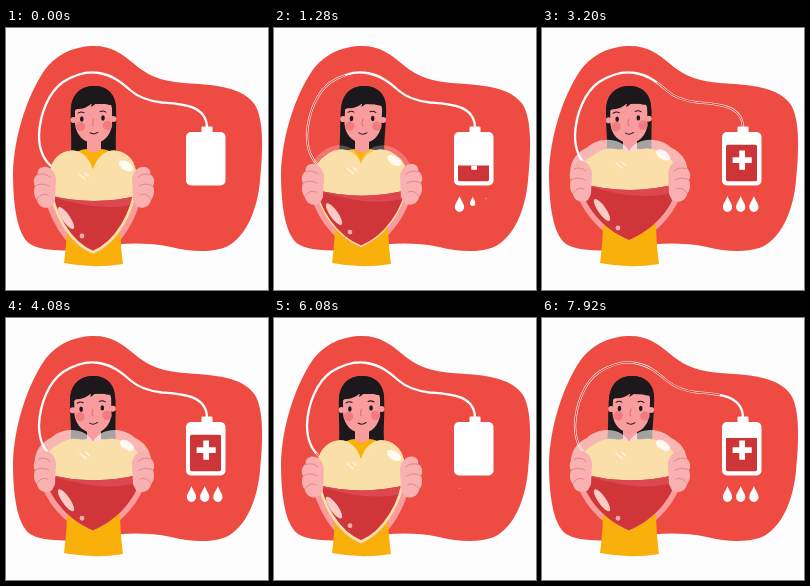
Write an HTML page that moves like this. It is 262 by 262 pixels and loops after 8 s.

```html
<!DOCTYPE html>
<html lang="en">
<head>
<meta charset="utf-8">
<title>Blood donation</title>
<style>
html, body { margin: 0; width: 100%; height: 100%; overflow: hidden; background: #fdfdfd; }
svg { display: block; width: 100vw; height: 100vh; }
.line { fill: none; stroke-linecap: round; stroke-linejoin: round; }
.skin { fill: #f99c9d; }
.hair { fill: #1d181c; }
</style>
</head>
<body>
<svg viewBox="0 0 262 262">
  <defs>
    <path id="heart"/>
    <clipPath id="heartClip"><use href="#heart"/></clipPath>
    <clipPath id="above"><rect width="262" height="172"/></clipPath>
    <clipPath id="below"><rect y="162" width="262" height="100"/></clipPath>
    <clipPath id="bagClip"><rect id="level" x="183" width="34" height="60"/></clipPath>
    <path id="drop" d="M0 0C1.4 4.5 4.6 7.3 4.6 11.2A4.6 4.8 0 0 1 -4.6 11.2C-4.6 7.3 -1.4 4.5 0 0Z" fill="#fff"/>
    <path id="hose" pathLength="100" d="M45 138C37 131 33 121 33 107C34 85 43 64 57 54C70 46 82 43 93 45C106 47 115 54 124 62C132 69 142 73 156 74.5C176 76 200 77 201 99"/>
    <g id="hand">
      <path fill="#f8b0b0" d="M50 151C49 143 43 138 37 139C32 140 31 144 32 146C27 149 27 155 29 158C27 163 28 169 31 172C32 179 40 182 46 178L49 172Z"/>
      <path class="line" stroke="#e2808a" stroke-width=".9" d="M32 147Q38 144 44 149M29 158Q36 154 43 158M31 171Q36 164 42 167"/>
    </g>
  </defs>

  <path fill="#ee4b42" d="M7 145C8 110 20 70 38 43C51 25 70 18 88 18C106 18 116 26 127 35C140 46 152 53 178 55C210 57 237 59 249 77C258 92 257 123 254 153C251 183 240 208 222 218C208 225 185 224 165 219C140 214 115 215 93 219C66 224 37 224 24 216C11 207 7 176 7 145Z"/>

  <use href="#hose" class="line" stroke="#fff" stroke-width="2.3"/>
  <use href="#hose" id="flow" class="line" stroke="#e5453e" stroke-width="1.1" style="stroke-linecap:butt"/>

  <g id="backHair"><path class="hair" d="M65 124C66 110 64 94 65 80C66 65 76 58 88 58C101 58 110 66 110 80C111 95 109 110 110 124Z"/></g>
  <g clip-path="url(#below)"><use href="#heart" fill="none" stroke="#f99c9d" stroke-width="11"/></g>
  <path fill="#fab00b" d="M66 128Q73 121 81 121H95Q103 121 110 128L114 200Q115 222 117 236Q87 241 58 235Q60 220 61 200Z"/>
  <path class="skin" d="M81 106H95V121Q88 128 81 121Z"/>

  <g id="head">
    <path class="skin" d="M69 76H106V96C105 108 97 115 88 115C78 115 70 107 69 96Z"/>
    <circle cx="67.5" cy="92" r="3" class="skin"/>
    <circle cx="107.5" cy="91" r="3" class="skin"/>
    <circle cx="74.5" cy="98.5" r="4.7" fill="#f37b7f"/>
    <circle cx="101.5" cy="97.5" r="4.7" fill="#f37b7f"/>
    <path class="hair" d="M65 86C64 67 75 58 88 58C102 58 111 68 110 86C107 84 106 80 105 77C100 77 96 75 93 70C92 74 89 77 85 79L86 75C81 80 76 81 71 81C69 82 67 84 65 86Z"/>
    <ellipse cx="75.8" cy="91" rx="1.8" ry="2.7" class="hair"/>
    <ellipse cx="97" cy="90" rx="1.8" ry="2.7" class="hair"/>
    <path class="line" stroke="#251719" stroke-width="1" d="M72 85Q75 83 78 84.5M94 83.5Q97 82 100 84M84 105Q88 107.5 92 104.5"/>
    <path class="line" stroke="#e06a74" stroke-width="1" d="M87.5 91Q85.5 97 87.5 98"/>
  </g>

  <g clip-path="url(#above)"><use href="#heart" id="glass" fill="#fff"/></g>
  <g clip-path="url(#heartClip)">
    <rect x="25" y="110" width="125" height="120" fill="#fbdfa9"/>
    <path id="blood" fill="#d03639"/>
    <path id="surface" fill="#dd474f"/>
    <use href="#heart" id="rim" fill="none" stroke="#fbdfa9"/>
  </g>
  <g id="gloss">
    <ellipse cx="60" cy="190" rx="4" ry="13" transform="rotate(-35 60 190)" fill="#fbcbc6"/>
    <circle cx="76" cy="208" r="2.4" fill="#f6b0ac"/>
  </g>
  <g id="shine">
    <ellipse cx="120" cy="138" rx="8" ry="4.3" transform="rotate(32 120 138)" fill="#fff" opacity=".85"/>
    <path class="line" stroke="#fff3d8" stroke-width="1.6" d="M73 146L79 151M79 145L82 148"/>
  </g>
  <g id="hands">
    <use href="#hand"/>
    <use href="#hand" transform="matrix(-1 0 0 1 176 0)"/>
  </g>

  <rect x="195.5" y="98.5" width="11" height="9" rx="1.2" fill="#fff"/>
  <rect x="180" y="104" width="39.5" height="53.5" rx="5" fill="#fff"/>
  <g clip-path="url(#bagClip)">
    <rect x="184" y="116.5" width="31" height="37" rx="2" fill="#cd3539"/>
    <path fill="#fff" d="M197.3 122.5H203V129.3H209.7V135H203V141.8H197.3V135H190.6V129.3H197.3Z"/>
  </g>
  <use href="#drop" class="drop"/>
  <use href="#drop" class="drop"/>
  <use href="#drop" class="drop"/>
</svg>
<script>
const LOOP = 8000, CYCLE = 5680;
const $ = id => document.getElementById(id);
const set = (el, name, value) => el.setAttribute(name, value);
const clamp = x => Math.min(1, Math.max(0, x));
const ramp = (t, from, to) => clamp((t - from) / (to - from));
const smooth = x => x * x * (3 - 2 * x);
const mix = (a, b, x) => a + (b - a) * x;
const drops = [...document.querySelectorAll('.drop')];

// Eased value between [time, value] stops
function track(t, stops) {
  let i = 1;
  while (i < stops.length - 1 && t > stops[i][0]) i++;
  const [t0, a] = stops[i - 1], [t1, b] = stops[i];
  return mix(a, b, smooth(ramp(t, t0, t1)));
}

// s: 0 = tall heart at rest, 1 = wide and short
function drawHeart(s) {
  const notch = mix(142, 130, s), top = mix(119, 118, s), low = mix(226, 212, s);
  const left = mix(43, 38, s), right = mix(131, 136, s), mid = mix(158, 152, s);
  set($('heart'), 'd', `M87 ${notch}C80 ${top} 62 ${top} 52 ${top + 9}` +
    `C${left} ${top + 16} ${left} ${mid - 8} ${left} ${mid}` +
    `C${left + 2} ${mid + 26} 62 ${low - 10} 87 ${low}` +
    `C112 ${low - 10} ${right - 2} ${mid + 26} ${right} ${mid}` +
    `C${right} ${mid - 8} ${right} ${top + 16} 122 ${top + 9}C112 ${top} 94 ${top} 87 ${notch}Z`);

  const y = mix(166, 155, s);
  const dip = `M38 ${y}Q88 ${y + 14} 138 ${y}`;
  set($('blood'), 'd', `${dip}V230H38Z`);
  set($('surface'), 'd', `${dip}V${y + 7}Q100 ${y + 22} 38 ${y}Z`);
  set($('rim'), 'stroke-width', 6 * (1 - s));
  set($('gloss'), 'transform', `translate(0 ${-8 * s})`);
  set($('shine'), 'transform', `translate(${s} ${-11 * s})`);
  set($('hands'), 'transform', `translate(0 ${-6 * s})`);

  const swell = 1 + 0.2 * s;
  set($('glass'), 'transform', `translate(87 165) scale(${swell}) translate(-87 -165)`);
  set($('glass'), 'opacity', 0.6 * smooth(ramp(s, 0.1, 1)));
}

function draw(time) {
  const t = time % LOOP % CYCLE;
  drawHeart(track(t, [[100, 0], [2500, 1], [3900, 1], [CYCLE, 0]]));

  const tilt = track(t, [[300, 0], [1200, 2.6], [2300, 2.6], [3200, -1], [4800, -1], [CYCLE, 0]]);
  for (const id of ['head', 'backHair']) set($(id), 'transform', `rotate(${tilt} 88 128)`);

  const front = 100 * ramp(t, 370, 2530), tail = 100 * ramp(t, 2300, 3800);
  const filled = front - tail;
  set($('flow'), 'stroke-dasharray', `0 ${tail} ${filled} 200`);
  $('flow').style.visibility = filled > 0 ? 'visible' : 'hidden';

  const drain = smooth(ramp(t, 4920, 5560));
  const height = 37 * ramp(t, 410, 2430) * (1 - drain);
  set($('level'), 'y', 153.5 - height);
  set($('level'), 'height', height);

  drops.forEach((drop, i) => {
    const size = ramp(t, 340 + 430 * i, 1240 + 430 * i) * (1 - drain);
    set(drop, 'transform', `translate(${185.5 + 13.2 * i} ${mix(170, 168, size)}) scale(${size})`);
  });
}

function tick() {
  draw(performance.now());
  requestAnimationFrame(tick);
}
tick();
</script>
</body>
</html>
```
